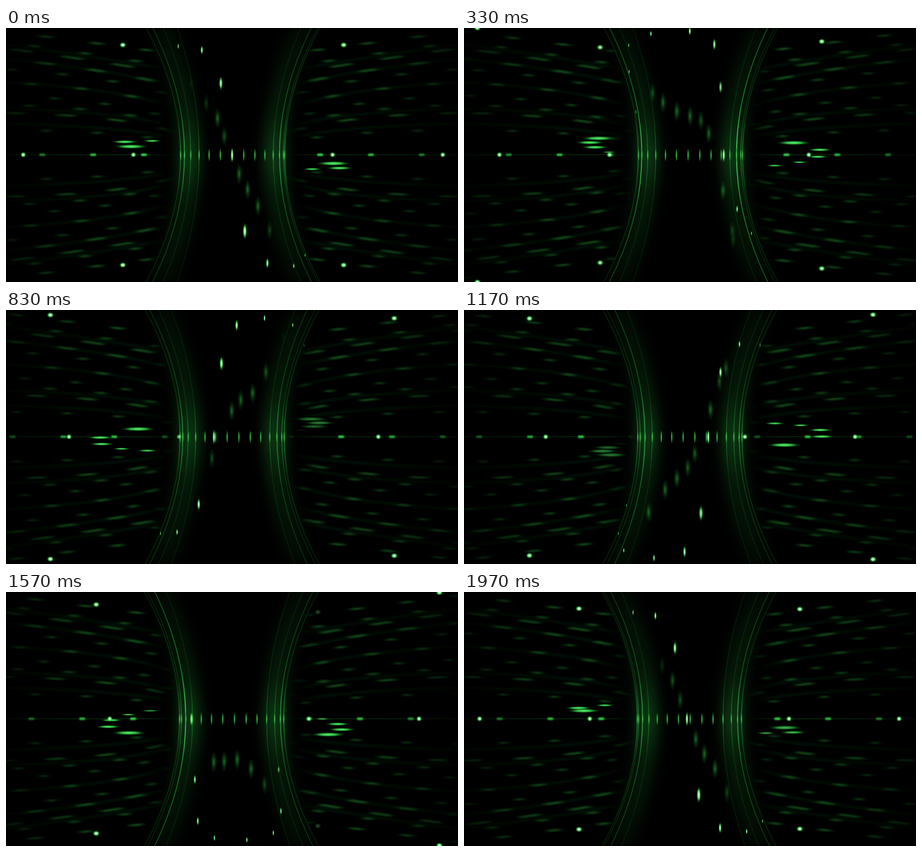
These frames come from a looping animation (960x540 px, 2 s). An HTML page without scripts:

```html
<!DOCTYPE html>
<html lang="en">
<head>
<meta charset="utf-8">
<title>Green throat</title>
<style>
html, body { margin: 0; width: 100%; height: 100%; overflow: hidden; background: #000; }
.stage, .layer, svg { position: absolute; left: 0; top: 0; width: 960px; height: 540px; }
.stage { overflow: hidden; }
.flip { transform: scaleY(-1); }
.turn { transform: rotate(180deg); }
.turn.flip { transform: scaleX(-1); }
i, path, .run { animation: 2s linear infinite; }
i { position: absolute; left: 0; top: 0; width: var(--w); height: var(--h);
  margin: calc(var(--h) / -2) 0 0 calc(var(--w) / -2); border-radius: 50%; }
.late i { animation-delay: -1s; }
.turn i { animation-direction: reverse; }

/* sparks circling the throat */
.spark i { --w: 8px; --h: 30px; opacity: 0; scale: .4;
  background: radial-gradient(closest-side, #efffef, #7dff88 40%, #1d9b2c88 72%, #0000); }
.haze i { --w: 14px; --h: 46px; opacity: 0;
  background: radial-gradient(closest-side, #1a7426, #0f4a1888 50%, #0000); }
.streak i { --w: 74px; --h: 10px; opacity: 0;
  background: radial-gradient(closest-side, #66f577, #2fb842 45%, #0f5a1c88 75%, #0000); }
.row i, .corner i { --w: 16px; --h: 13px;
  background: radial-gradient(closest-side, #efffef 12%, #6df57e 42%, #1d9b2c77 72%, #0000); }
.row i { --w: 13px; }

.spark i:nth-child(1) { animation-name: b1 } .spark i:nth-child(2) { animation-name: b2 }
.spark i:nth-child(3) { animation-name: b3 } .spark i:nth-child(4) { animation-name: b4 }
.spark i:nth-child(5) { animation-name: b5 } .spark i:nth-child(6) { animation-name: b6 }
.spark i:nth-child(7) { animation-name: b7 }
@keyframes b1 {
  0%, 34% { translate: 372px 385px; opacity: 0 }
  41.5% { translate: 409px 413px; opacity: 1; scale: .9 } 58.5% { translate: 503px 432px; scale: 1.2 }
  68.5% { translate: 555px 410px; scale: .9 } 86.5% { translate: 598px 352px; opacity: .6; scale: .3 }
  90%, 100% { translate: 602px 340px; opacity: 0 } }
@keyframes b2 {
  0%, 36% { translate: 340px 445px; opacity: 0 }
  41.5% { translate: 363px 472px; opacity: 1; scale: .5 } 58.5% { translate: 468px 514px; scale: .9 }
  68.5% { translate: 547px 503px; scale: .9 } 86.5% { translate: 613px 436px; opacity: .8; scale: .35 }
  92%, 100% { translate: 618px 400px; opacity: 0 } }
@keyframes b3 {
  0%, 38% { translate: 325px 455px; opacity: 0 }
  41.5% { translate: 328px 475px; opacity: .7; scale: .35 } 58.5% { translate: 403px 527px; scale: .6 }
  68.5% { translate: 498px 535px; opacity: 1; scale: .7 } 86.5% { translate: 623px 494px; opacity: .8; scale: .35 }
  94%, 100% { translate: 638px 450px; opacity: 0 } }
@keyframes b4 {
  0% { translate: 639px 483px; opacity: .8; scale: .3 } 4%, 52% { translate: 328px 485px; opacity: 0 }
  58.5% { translate: 339px 511px; opacity: 1; scale: .4 } 68.5% { translate: 411px 532px; scale: .5 }
  86.5% { translate: 591px 523px; opacity: 1; scale: .45 } 100% { translate: 639px 483px; opacity: .8; scale: .3 } }
@keyframes b5 {
  0% { translate: 611px 506px; opacity: 1; scale: .45 } 14% { translate: 640px 440px; opacity: 0 }
  52% { translate: 326px 440px; opacity: 0 } 58.5% { translate: 328px 475px; opacity: .7; scale: .3 }
  68.5% { translate: 355px 510px; scale: .4 } 86.5% { translate: 512px 533px; opacity: 1; scale: .6 }
  100% { translate: 611px 506px; opacity: 1; scale: .45 } }
@keyframes b6 {
  0% { translate: 555px 500px; opacity: 1; scale: .8 } 16.5% { translate: 613px 437px; opacity: .9; scale: .35 }
  22%, 54% { translate: 348px 380px; opacity: 0 } 58.5% { translate: 345px 415px; opacity: .7; scale: .25 }
  68.5% { translate: 352px 455px; scale: .4 } 86.5% { translate: 451px 512px; opacity: 1; scale: .9 }
  100% { translate: 555px 500px; opacity: 1; scale: .8 } }
@keyframes b7 {
  0% { translate: 507px 432px; opacity: 1; scale: 1.2 } 16.5% { translate: 580px 385px; opacity: .9; scale: .6 }
  24% { translate: 598px 350px; opacity: 0 } 63% { translate: 362px 350px; opacity: 0 }
  68.5% { translate: 367px 368px; opacity: .7; scale: .4 } 86.5% { translate: 428px 423px; opacity: 1; scale: 1 }
  100% { translate: 507px 432px; opacity: 1; scale: 1.2 } }

.haze i:nth-child(1) { animation-name: d1 } .haze i:nth-child(2) { animation-name: d2 }
.haze i:nth-child(3) { animation-name: d3 } .haze i:nth-child(4) { animation-name: d4 }
.haze i:nth-child(5) { animation-name: d5 } .haze i:nth-child(6) { animation-name: d6 }
@keyframes d1 {
  0%, 33% { translate: 395px 300px; opacity: 0 } 41.5% { translate: 437px 315px; opacity: .7 }
  58.5% { translate: 490px 305px } 68.5% { translate: 527px 318px; opacity: 1 }
  78%, 100% { translate: 560px 355px; opacity: 0 } }
@keyframes d2 {
  0%, 42% { translate: 415px 370px; opacity: 0 } 50% { translate: 449px 348px; opacity: 1 }
  58.5% { translate: 475px 335px } 68.5% { translate: 510px 345px; opacity: .8 }
  86.5% { translate: 580px 460px; opacity: .6 } 93%, 100% { translate: 592px 490px; opacity: 0 } }
@keyframes d3 {
  0% { translate: 560px 430px; opacity: .6 } 5% { opacity: 0 } 42% { translate: 400px 400px; opacity: 0 }
  58.5% { translate: 452px 358px; opacity: 1 } 68.5% { translate: 487px 352px }
  86.5% { translate: 547px 395px; opacity: 1 } 100% { translate: 560px 430px; opacity: .6 } }
@keyframes d4 {
  0% { translate: 535px 378px; opacity: 1 } 16% { translate: 575px 450px; opacity: .6 }
  20% { opacity: 0 } 48% { translate: 385px 430px; opacity: 0 }
  58.5% { translate: 427px 382px; opacity: 1 } 68.5% { translate: 458px 358px }
  86.5% { translate: 517px 355px } 100% { translate: 535px 378px; opacity: 1 } }
@keyframes d5 {
  0% { translate: 513px 343px; opacity: 1 } 16.5% { translate: 570px 430px; opacity: .6 }
  22% { opacity: 0 } 50% { translate: 380px 455px; opacity: 0 }
  58.5% { translate: 392px 430px; opacity: 1 } 68.5% { translate: 430px 370px }
  86.5% { translate: 490px 352px } 100% { translate: 513px 343px; opacity: 1 } }
@keyframes d6 {
  0% { translate: 495px 310px; opacity: 1 } 16.5% { translate: 550px 345px; opacity: 1 }
  23% { translate: 570px 380px; opacity: 0 } 60% { translate: 385px 425px; opacity: 0 }
  68.5% { translate: 405px 395px; opacity: 1 } 86.5% { translate: 470px 335px }
  100% { translate: 495px 310px; opacity: 1 } }

.streak i:nth-child(1) { animation-name: s1 } .streak i:nth-child(2) { animation-name: s2 }
.streak i:nth-child(3) { animation-name: s3 } .streak i:nth-child(4) { animation-name: s4 }
.streak i:nth-child(5) { animation-name: s5 }
@keyframes s1 {
  0%, 54% { translate: 655px 283px; opacity: 0 } 58.5% { translate: 680px 287px; opacity: 1 }
  68.5% { translate: 705px 298px } 86.5% { translate: 668px 307px; opacity: 1 }
  96%, 100% { translate: 630px 309px; opacity: 0 } }
@keyframes s2 {
  0%, 44% { translate: 670px 240px; opacity: 0 } 50% { translate: 708px 242px; opacity: 1 }
  58.5% { translate: 760px 269px } 68.5% { translate: 755px 284px; scale: .7 }
  86.5% { translate: 680px 299px; opacity: 1 } 97%, 100% { translate: 650px 301px; opacity: 0 } }
@keyframes s3 {
  0%, 44% { translate: 640px 250px; opacity: 0 } 50% { translate: 695px 252px; opacity: 1; scale: 1 }
  58.5% { translate: 757px 255px; scale: .7 } 68.5% { translate: 750px 269px; scale: .6 }
  86.5% { translate: 668px 290px; opacity: 1 } 95%, 100% { translate: 645px 294px; opacity: 0 } }
@keyframes s4 {
  0%, 45% { translate: 620px 240px; opacity: 0 } 50% { translate: 650px 240px; opacity: 1; scale: .55 }
  58.5% { translate: 715px 245px } 68.5% { translate: 712px 257px }
  86.5% { translate: 640px 280px; opacity: .8; scale: .4 } 92%, 100% { translate: 625px 285px; opacity: 0 } }
@keyframes s5 {
  0%, 52% { translate: 640px 240px; opacity: 0 } 58.5% { translate: 660px 241px; opacity: .9; scale: .6 }
  68.5% { translate: 660px 249px; opacity: .9; scale: .5 } 78%, 100% { translate: 640px 260px; opacity: 0 } }

/* beads on the middle row, one pitch per loop */
.row i { top: 269.5px; left: calc(36px + var(--n) * 234px); animation-name: pitch; }
@keyframes pitch { from { translate: -234px } to { translate: 0 } }
.row .in { animation-name: pitch, sink; }
.row .out { animation-name: pitch, rise; }
@keyframes sink { 0%, 40% { opacity: 1 } 45%, 100% { opacity: 0 } }
@keyframes rise { 0%, 53% { opacity: 0 } 58%, 100% { opacity: 1 } }

.corner i:nth-child(1) { animation-name: c1 } .corner i:nth-child(2) { animation-name: c2 }
.corner i:nth-child(3) { animation-name: c3 } .corner i:nth-child(4) { animation-name: c4 }
@keyframes c1 { from { translate: -15px -8px } to { translate: 248px 35.5px } }
@keyframes c2 { 0% { translate: 248px 35.5px; opacity: 1 } 16.5% { translate: 289px 40.5px; opacity: .9 }
  28%, 100% { translate: 318px 44px; opacity: 0 } }
@keyframes c3 { 0%, 76% { translate: 656px 43px; opacity: 0 } 86.5% { translate: 682px 39.5px; opacity: .9 }
  100% { translate: 717px 35.5px; opacity: 1 } }
@keyframes c4 { from { translate: 717px 35.5px } to { translate: 976px -9px } }

/* 28 meridians: each turns by one step per loop */
.tick i { --w: 4px; --h: 32px; left: 480px; top: 269.5px; animation-name: tick;
  background: radial-gradient(closest-side, #4fe066, #24a038 50%, #0e5a1866 80%, #0000); }
@keyframes tick {
  from { translate: calc(112px * sin(var(--k) * 12.857deg)) }
  to { translate: calc(112px * sin((var(--k) - 1) * 12.857deg)) } }
.tick .lead { --w: 6px; --h: 34px; animation: lead 1s linear infinite;
  background: radial-gradient(closest-side, #efffef, #7dff88 45%, #1d9b2c77 75%, #0000); }
@keyframes lead {
  0% { translate: 0 } 16.7% { translate: 38px } 33.3% { translate: 72px } 49.9% { translate: 97px; opacity: 1 }
  50% { translate: -97px; opacity: 0 } 58% { opacity: 1 }
  66.7% { translate: -72px } 83.3% { translate: -38px } 100% { translate: 0 } }

path { fill: none; }
.arc { stroke: url(#dim); stroke-width: 2; animation-name: arc; }
@keyframes arc {
  from { transform: scaleX(sin(var(--k) * 12.857deg)) }
  to { transform: scaleX(sin((var(--k) - 1) * 12.857deg)) } }
.limb { stroke: url(#lit); stroke-width: 1.8; }
.left { animation-name: left; }
.right { animation-name: right; }
@keyframes left {
  0% { transform: scaleX(-.901); opacity: .4 } 16.5% { opacity: .7 } 41.5% { opacity: .3 }
  49.9% { transform: scaleX(-.944); opacity: .15 } 50% { transform: scaleX(-.847); opacity: .15 }
  58.5% { opacity: .55 } 68.5% { opacity: 1 } 86.5% { opacity: .85 }
  100% { transform: scaleX(-.901); opacity: .4 } }
@keyframes right {
  0% { transform: scaleX(.901); opacity: .45 } 16.5% { opacity: 1 } 41.5% { opacity: .3 }
  49.9% { transform: scaleX(.847); opacity: .15 } 50% { transform: scaleX(.944); opacity: .15 }
  68.5% { opacity: .25 } 86.5% { opacity: .45 } 100% { transform: scaleX(.901); opacity: .45 } }
.band { stroke: url(#mist); stroke-width: 46px; filter: blur(13px); }

.run { animation-name: run; }
.back { animation-direction: reverse; }
@keyframes run { from { stroke-dashoffset: 0 } to { stroke-dashoffset: -108px } }
</style>
</head>
<body>
<div class="stage">
<svg viewBox="0 0 960 540">
  <defs>
    <linearGradient id="dim" gradientUnits="userSpaceOnUse" x1="0" y1="-270" x2="0" y2="270">
      <stop offset="0" stop-color="#06200a"/><stop offset=".35" stop-color="#0b3612"/>
      <stop offset=".5" stop-color="#228033"/>
      <stop offset=".65" stop-color="#0b3612"/><stop offset="1" stop-color="#06200a"/>
    </linearGradient>
    <linearGradient id="lit" gradientUnits="userSpaceOnUse" x1="0" y1="-270" x2="0" y2="270">
      <stop offset="0" stop-color="#135a1f"/><stop offset=".3" stop-color="#1f8a30"/>
      <stop offset=".42" stop-color="#4be060"/><stop offset=".58" stop-color="#4be060"/>
      <stop offset=".7" stop-color="#1f8a30"/><stop offset="1" stop-color="#135a1f"/>
    </linearGradient>
    <linearGradient id="mist" gradientUnits="userSpaceOnUse" x1="0" y1="-270" x2="0" y2="270">
      <stop offset="0" stop-color="#020a03"/><stop offset=".32" stop-color="#051a08"/>
      <stop offset=".5" stop-color="#0c3813"/>
      <stop offset=".68" stop-color="#051a08"/><stop offset="1" stop-color="#020a03"/>
    </linearGradient>
    <linearGradient id="fade" gradientUnits="userSpaceOnUse" x1="115" y1="0" x2="480" y2="0">
      <stop offset="0" stop-color="#1f8a2e" stop-opacity="0"/><stop offset=".2" stop-color="#1f8a2e"/>
      <stop offset=".6" stop-color="#1f8a2e" stop-opacity=".8"/>
      <stop offset="1" stop-color="#1f8a2e" stop-opacity=".3"/>
    </linearGradient>
    <filter id="soft" filterUnits="userSpaceOnUse" x="-490" y="-280" width="980" height="560">
      <feGaussianBlur stdDeviation="7 1"/>
    </filter>
    <g id="rays" fill="none" stroke="url(#fade)">
      <path d="M122 28Q230 50 480 53" stroke-dasharray="0 50 16 42"/>
      <path d="M122 48Q230 84 480 89" stroke-dasharray="36 72"/>
      <path d="M125 62Q240 100 480 106" stroke-dasharray="0 84 20 4"/>
      <path d="M128 76Q240 116 480 126" stroke-dasharray="0 30 16 62"/>
      <path d="M134 104Q240 140 480 154" stroke-dasharray="0 70 24 14"/>
      <path d="M140 130Q250 165 480 182" stroke-dasharray="18 90"/>
      <path d="M146 152Q260 180 480 204" stroke-dasharray="0 20 36 52"/>
      <path d="M152 176Q270 198 480 226" stroke-dasharray="0 60 44 4"/>
      <path d="M156 192Q270 210 480 240" stroke-dasharray="0 40 20 48"/>
      <path d="M160 220Q280 236 480 262" stroke-dasharray="0 8 26 74"/>
    </g>
    <path id="mid" d="M115 0H480"/>
  </defs>
  <g transform="translate(480 269.5)">
    <g filter="url(#soft)">
      <!-- steady glow under the moving dashes -->
      <g stroke="url(#fade)" stroke-width="7" fill="none" opacity=".1">
        <path id="glow" d="M122 36Q230 60 480 66M126 60Q230 92 480 98M134 104Q240 140 480 154M146 152Q260 180 480 204M154 184Q270 206 480 234"/>
        <use href="#glow" transform="scale(1 -1)"/>
        <use href="#glow" transform="scale(-1 1)"/>
        <use href="#glow" transform="scale(-1)"/>
      </g>
      <g stroke-width="5" opacity=".55">
        <g class="run"><use href="#rays"/><use href="#rays" transform="scale(1 -1)"/></g>
        <g class="run back"><use href="#rays" transform="scale(-1 1)"/><use href="#rays" transform="scale(-1)"/></g>
      </g>
    </g>
    <g stroke="url(#fade)" fill="none">
      <g stroke-width="2" opacity=".3"><use href="#mid"/><use href="#mid" transform="scale(-1 1)"/></g>
      <g stroke-width="5" stroke-dasharray="0 66 12 30" style="filter:blur(1.6px) brightness(1.7)">
        <g class="run"><use href="#mid"/></g>
        <g class="run back"><use href="#mid" transform="scale(-1 1)"/></g>
      </g>
    </g>
    <path class="band" d="M150-270Q31 0 150 270"/>
    <path class="band" d="M-150-270Q-31 0-150 270"/>
    <path class="arc" style="--k:4" d="M187-270Q37 0 187 270"/>
    <path class="arc" style="--k:5" d="M187-270Q37 0 187 270"/>
    <path class="arc" style="--k:6" d="M187-270Q37 0 187 270"/>
    <path class="arc" style="--k:7" d="M187-270Q37 0 187 270"/>
    <path class="arc" style="--k:-3" d="M187-270Q37 0 187 270"/>
    <path class="arc" style="--k:-4" d="M187-270Q37 0 187 270"/>
    <path class="arc" style="--k:-5" d="M187-270Q37 0 187 270"/>
    <path class="arc" style="--k:-6" d="M187-270Q37 0 187 270"/>
    <path class="limb left" d="M187-270Q37 0 187 270"/>
    <path class="limb right" d="M187-270Q37 0 187 270"/>
  </g>
</svg>

<div class="layer haze"><i></i><i></i><i></i><i></i><i></i><i></i></div>
<div class="layer haze flip late"><i></i><i></i><i></i><i></i><i></i><i></i></div>

<div class="layer streak"><i></i><i></i><i></i><i></i><i></i></div>
<div class="layer streak flip late"><i></i><i></i><i></i><i></i><i></i></div>
<div class="layer streak turn"><i></i><i></i><i></i><i></i><i></i></div>
<div class="layer streak turn flip late"><i></i><i></i><i></i><i></i><i></i></div>

<div class="layer tick">
  <i style="--k:-6"></i><i style="--k:-5"></i><i style="--k:-4"></i><i style="--k:-3"></i><i style="--k:-2"></i>
  <i style="--k:-1"></i><i style="--k:0"></i><i style="--k:1"></i><i style="--k:2"></i><i style="--k:3"></i>
  <i style="--k:4"></i><i style="--k:5"></i><i style="--k:6"></i><i style="--k:7"></i>
  <i class="lead"></i>
</div>

<div class="layer row">
  <i style="--n:0"></i><i style="--n:1"></i><i class="in" style="--n:2"></i>
  <i class="out" style="--n:2.81"></i><i style="--n:3.81"></i><i style="--n:4.81"></i>
</div>
<div class="layer corner"><i></i><i></i><i></i><i></i></div>
<div class="layer corner flip"><i></i><i></i><i></i><i></i></div>

<div class="layer spark"><i></i><i></i><i></i><i></i><i></i><i></i><i></i></div>
<div class="layer spark flip late"><i></i><i></i><i></i><i></i><i></i><i></i><i></i></div>
</div>
</body>
</html>
```
